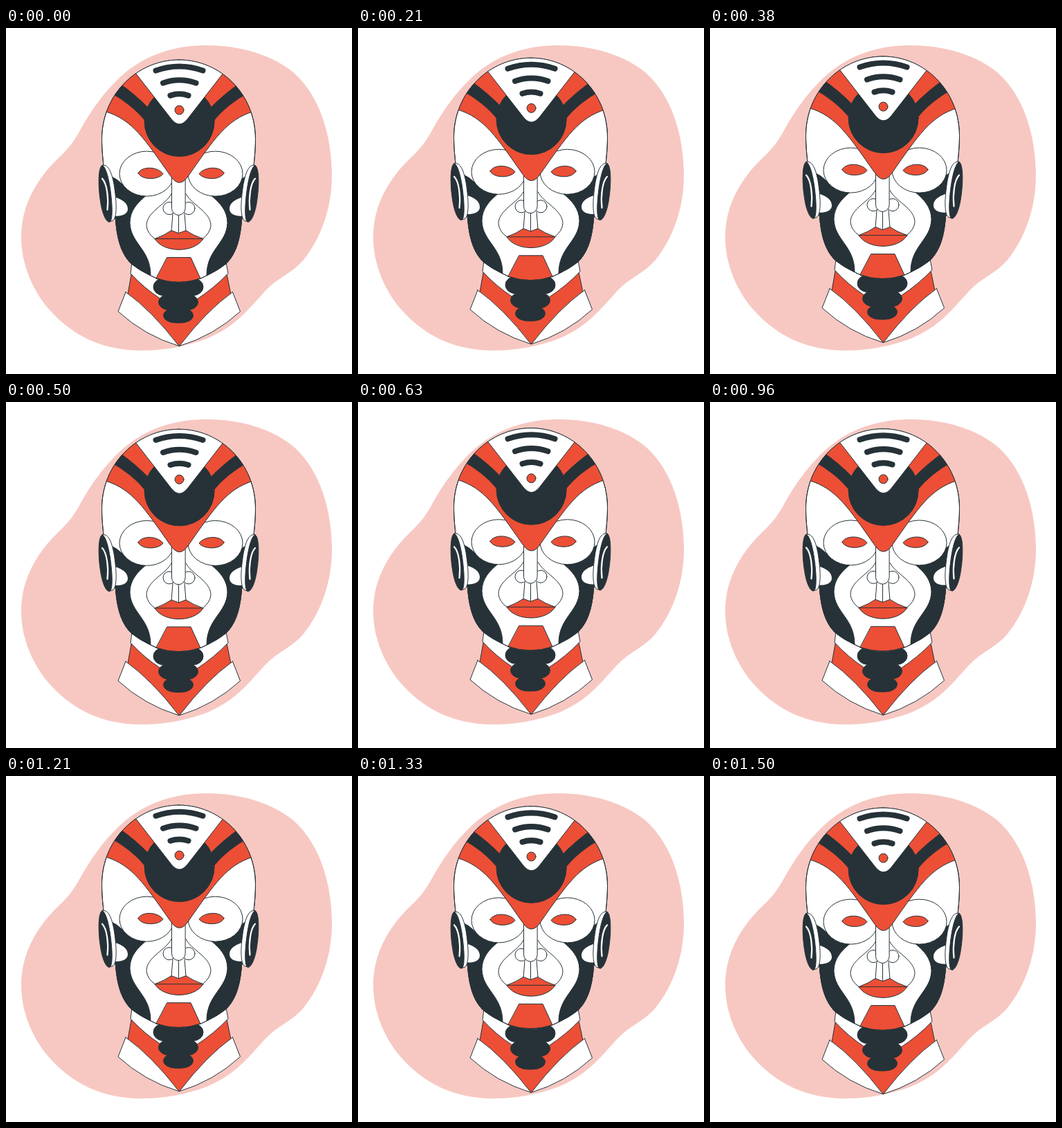
An HTML page for the animation above (1540 ms loop, 500x500 px).

```html
<!DOCTYPE html>
<html lang="en">
<head>
<meta charset="utf-8">
<title>Floating robot head</title>
<style>
  html, body { margin: 0; width: 100%; height: 100%; overflow: hidden; background: #fff; }
  svg { display: block; width: 100vw; height: 100vh; }
  #robot { fill: #fff; stroke: #263238; stroke-width: 1; stroke-linejoin: round; stroke-linecap: round; }
  #robot .red { fill: #ec4f35; }
  #robot .dark { fill: #263238; }
  #robot .line { fill: none; }
  #robot .signal { fill: none; stroke-width: 8; }
</style>
</head>
<body>
<svg viewBox="0 0 500 500">
  <defs>
    <path id="skull" d="M250 45.400C190 45.400 138.500 95 138.500 160C138.500 176 140 188 141 199L158.500 277C161 310 169 328 181 340Q195 351 217 361Q250 373 282 361Q304 351 318 340C330 328 338 310 340.500 277L358 199C359 188 360.500 176 360.500 160C360.500 95 310 45.400 250 45.400Z"/>
    <clipPath id="inSkull"><use href="#skull"/></clipPath>
  </defs>

  <path fill="#f7c8c2" d="M290 25C340 25 386 40 415 64C453 97 471 155 471 213C471 260 455 304 430 335C410 358 394 358 370 385C345 413 328 433 290 449C260 460 230 466 195 466C140 466 95 445 60 404C37 376 22 340 22 302C22 265 37 230 65 199C85 178 92 175 108 146C124 118 139 96 165 71C199 40 240 25 290 25Z"/>

  <g id="robot">
    <!-- neck and collar -->
    <path class="red" d="M182 350L176 384L250 459L325 384L318 350Z"/>
    <path d="M182 338L180 354Q199 375 225 392H275Q301 375 321 354L318 338Z"/>
    <path id="collar" d="M173 381L162 409Q200 444 250 459Q210 407 173 381Z"/>
    <use href="#collar" transform="matrix(-1 0 0 1 500.500 0)"/>
    <g class="dark">
      <rect x="213" y="361" width="72" height="25" rx="15" ry="12.500"/>
      <rect x="220.500" y="384" width="57" height="23" rx="16" ry="11.500"/>
      <rect x="227.500" y="404" width="43" height="21.500" rx="18" ry="10.700"/>
    </g>

    <!-- face -->
    <use href="#skull"/>
    <g id="side">
      <path class="dark" d="M151 213.500Q160 217 169 226Q182 240 202 242C191 251 179 263 179 281C180 311 209 319 209 357Q193 350 181 340C169 328 161 310 158.500 277Z"/>
      <path stroke="none" d="M155 243C163 246 176 250 176 261C176 269 166 272 157 271Z"/>
      <path class="line" d="M239 239C231 255 203 265 203 285Q204 296 215 304"/>
      <path class="line" d="M241 268L239 293"/>
    </g>
    <use href="#side" transform="matrix(-1 0 0 1 499 0)"/>
    <g id="eye">
      <ellipse cx="203.500" cy="210" rx="39.500" ry="32.500"/>
      <path class="red" d="M191 209C196 199 218 199 227 210C221 219 196 220 191 209Z"/>
    </g>
    <use href="#eye" transform="matrix(-1 0 0 1 506 0)"/>
    <path class="line" d="M249.500 268V296"/>
    <circle cx="236" cy="260" r="9"/>
    <circle cx="264" cy="260" r="9"/>
    <path d="M239.500 200V260a9.800 9.800 0 0 0 19.600 0V200Z"/>
    <path class="red" d="M215 304Q229 299 239 292L249.500 296L260 292Q270 299 285 304C272 325 228 325 215 304H285"/>
    <path class="red" d="M233 331H267L281 361.500Q249 372 217 361.500Z"/>

    <!-- forehead -->
    <g clip-path="url(#inSkull)">
      <g transform="translate(.6 0)">
        <path class="red" d="M187 65L130 80L143 120C182 132 199 159 237 213Q250 232.500 263 213C301 159 318 132 357 120L370 80L313 65Z"/>
        <g id="band">
          <path class="dark" d="M149 92Q182 110 201 134L207 117Q186 95 161 78Z"/>
        </g>
        <use href="#band" transform="matrix(-1 0 0 1 500 0)"/>
        <circle class="dark" cx="250" cy="134.500" r="50.500"/>
        <path d="M187 65L238 130.500Q250 146 262 130.500L313 65L300 30H200Z"/>
      </g>
    </g>
    <use href="#skull" class="line"/>
    <path class="signal" d="M216.500 61Q250.500 49 284.500 61M227 79Q250.500 70.500 274.500 79M237.500 97Q250.500 92.500 263.500 97"/>
    <circle class="red" cx="250.500" cy="118" r="6.500"/>

    <!-- ears -->
    <g id="ear">
      <path d="M139 198C147 196 152 205 156 225C160 250 161 274 154 278L149 279.500Z"/>
      <path class="dark" d="M139 198C133 200 133 228 136.500 250C139 268 145 281 150 279.500C155 277 153.500 250 150 228C147 210 143 199 139 198Z"/>
      <path class="line" style="stroke:#fff;stroke-width:2.200" d="M139 217C146 224 148.500 246 146.500 262"/>
    </g>
    <use href="#ear" transform="matrix(-1 0 0 1 499 0)"/>
  </g>
</svg>
<script>
  const LOOP = 1540, PERIOD = 1500, FPS = 24, LIFT = 10, REST = 0.6;
  const robot = document.getElementById("robot");

  function draw(now) {
    // Linear rise and fall, stepped at 24 fps, with one step of rest at the bottom
    const step = Math.floor((now % LOOP + 4.9) * FPS / 1000);
    const time = Math.min(step * 1000 / FPS, PERIOD);
    const lift = LIFT * (1 - Math.abs(2 * time / PERIOD - 1));
    robot.setAttribute("transform", `translate(0 ${REST - lift})`);
    requestAnimationFrame(draw);
  }
  draw(performance.now());
</script>
</body>
</html>
```
